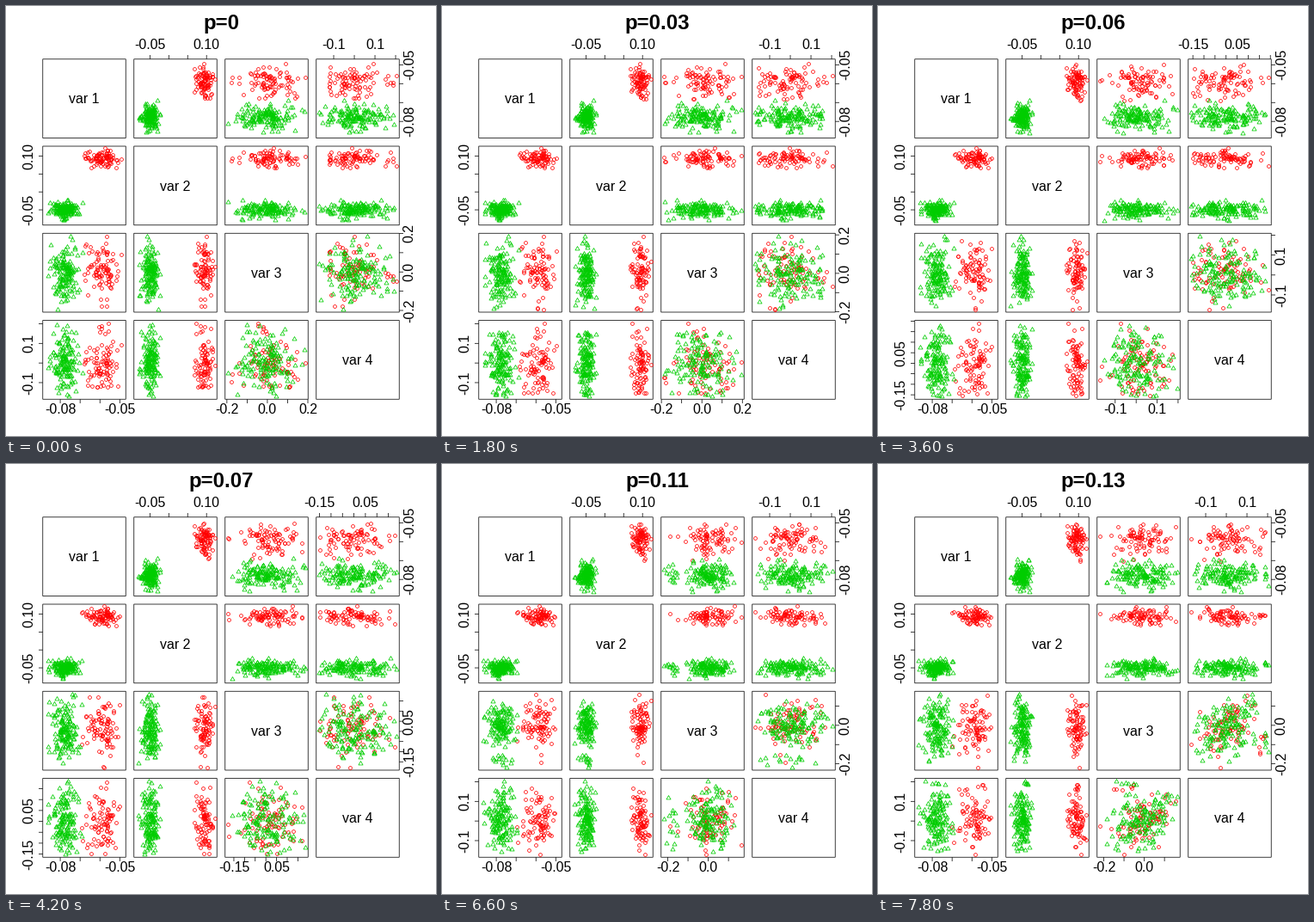
Write a matplotlib script that moves like this. It is 500x500 px and loops after 8 s.

```python
import numpy as np
import matplotlib.pyplot as plt
from matplotlib.animation import FuncAnimation
from matplotlib.path import Path

PX = 0.72                      # points per pixel at 100 dpi
SIZE = 500
LINE = 9.504                   # height of one margin line
LEFT, TOP = 4.5 * LINE, 6.5 * LINE
RIGHT = BOTTOM = SIZE - LEFT
W = (RIGHT - LEFT - 3 * LINE) / 4
H = (BOTTOM - TOP - 3 * LINE) / 4
TICK = LINE / 2
STROKE = 0.75
FONT, LABEL_GAP = 15.84, 11
RADIUS = 1.9
N_RED, N_GREEN = 90, 145
N = N_RED + N_GREEN

rng = np.random.default_rng(12)
A, B = np.clip(rng.normal(size=(2, 4, N)), -2.7, 2.7)
red = np.arange(N) < N_RED
green = ~red


def bump(step, centre, width):
    return np.exp(-((step - centre) / width) ** 2)


def ramp(step, start, end):
    u = np.clip((step - start) / (end - start), 0, 1)
    return u * u * (3 - 2 * u)


def limits(step):
    """Axis range of each variable; the last two breathe and slide."""
    squeeze = bump(step, 7, 1.6)
    shift = .02 * bump(step, 5, 2) - .024 * ramp(step, 7, 10) - .004
    half3, half4 = .205 - .0105 * squeeze, .201 - .02 * squeeze
    return [(-.0888, -.047), (-.0925, .1275),
            (shift - half3, shift + half3), (.0165 - half4, .0165 + half4)]


def fit(v, lim):
    """Scale v about zero so that it fills the axis inside a 4% margin."""
    pad = (lim[1] - lim[0]) * .04 / 1.08
    lo, hi = lim[0] + pad, lim[1] - pad
    return np.where(v < 0, v * lo / v.min(), v * hi / v.max())


def drift(k, angle):
    return np.cos(angle) * A[k] + np.sin(angle) * B[k]


def sample(step, lims):
    t = max(step - 1, 0)
    v1 = np.where(red, -.0592, -.0778)
    v1 = v1 + np.where(red, .0044, .0034) * drift(0, .03 * t)
    v2 = np.where(red, .0925, -.049) + .011 * drift(1, .03 * t)
    v3, v4 = drift(2, .13 * t), drift(3, .13 * t)

    # a green group splits off along variable 3
    w = bump(step, 10.5, 1.8)
    v3[green] *= 1 - .35 * w
    group = slice(N - 14, N)
    v3[group] += w * (-2.8 + .3 * B[0, group] - v3[group])

    # then the cloud tilts, leaving a few points aside
    c = ramp(step, 11, 13)
    v4 = v4 * (1 - .25 * c)
    v3 = v3 + .55 * c * v4
    aside = slice(N_RED - 7, N_RED + 10)
    v3[aside] += c * (-1.1 + .5 * A[0, aside] - v3[aside])
    v4[aside] += c * (1.9 + .45 * A[1, aside] - v4[aside])
    return [v1, v2, fit(v3, lims[2]), fit(v4, lims[3])]


def to_x(v, col, lim):
    return LEFT + col * (W + LINE) + W * (v - lim[0]) / (lim[1] - lim[0])


def to_y(v, row, lim):
    return TOP + row * (H + LINE) + H * (lim[1] - v) / (lim[1] - lim[0])


def ticks(lim):
    span = lim[1] - lim[0]
    unit = .01 if span < .1 else .05 if span < .392 else .1
    steps = np.arange(np.ceil(lim[0] / unit), np.floor(lim[1] / unit) + 1)
    return unit * steps, 1 if unit == .1 else 2


def text_width(s):
    return FONT * sum({'-': .333, '.': .278}.get(ch, .556) for ch in s)


def spaced_labels(values, places, digits):
    """Keep each label that clears the one before it."""
    end = -np.inf
    for v, p in zip(values, places):
        s = f'{v:.{digits}f}'
        half = text_width(s) / 2
        if p - half >= end + LABEL_GAP:
            end = p + half
            yield s, p


fig = plt.figure(figsize=(5, 5), dpi=100, facecolor='white')
ax = fig.add_axes([0, 0, 1, 1])
ax.set(xlim=(0, SIZE), ylim=(SIZE, 0))
ax.axis('off')


def put_text(x, y, s, size=FONT, **kw):
    return ax.text(x, y, s, fontsize=size * PX, family='Liberation Sans',
                   ha='center', va='baseline', rotation_mode='anchor', **kw)


def markers(shape, extent, color):
    return ax.plot([], [], ls='', marker=shape, ms=2 * extent * PX,
                   mfc='none', mec=color, mew=STROKE * PX)[0]


for row in range(4):
    for col in range(4):
        x, y = LEFT + col * (W + LINE), TOP + row * (H + LINE)
        ax.add_patch(plt.Rectangle((x, y), W, H, fill=False, ec='black',
                                   lw=STROKE * PX, snap=False))
        if row == col:
            put_text(x + W / 2, y + H / 2 + 5.7, f'var {row + 1}')

triangle = Path([(0, 1.555), (1.347, -.778), (-1.347, -.778), (0, 1.555)],
                closed=True)
reds = markers('o', RADIUS, '#ff0000')
greens = markers(triangle, 1.555 * RADIUS, '#00cd00')
tick_line, = ax.plot([], [], color='black', lw=STROKE * PX, snap=False,
                     solid_capstyle='butt')
title = put_text(SIZE / 2, 27.5, '', 24, weight='bold')
labels = []


def draw_axes(lims):
    while labels:
        labels.pop().remove()
    xs, ys = [], []
    for k, lim in enumerate(lims):
        values, digits = ticks(lim)
        px, py = to_x(values, k, lim), to_y(values, k, lim)
        if k % 2:
            edge_x, edge_y, out, base = LEFT, TOP, -TICK, -1.2 * LINE
        else:
            edge_x, edge_y, out, base = RIGHT, BOTTOM, TICK, 1.75 * LINE
        for p, q in zip(px, py):
            xs += [p, p, np.nan, edge_x, edge_x + out, np.nan]
            ys += [edge_y, edge_y + out, np.nan, q, q, np.nan]
        for s, p in spaced_labels(values, px, digits):
            labels.append(put_text(p, edge_y + base, s))
        for s, p in spaced_labels(values, -py, digits):
            labels.append(put_text(edge_x + base, -p, s, rotation=90))
    tick_line.set_data(xs, ys)


def update(frame):
    step = frame // 3
    lims = limits(step)
    data = sample(step, lims)
    cells = [(r, c) for r in range(4) for c in range(4) if r != c]
    xs = np.array([to_x(data[c], c, lims[c]) for r, c in cells])
    ys = np.array([to_y(data[r], r, lims[r]) for r, c in cells])
    reds.set_data(xs[:, red].ravel(), ys[:, red].ravel())
    greens.set_data(xs[:, green].ravel(), ys[:, green].ravel())
    draw_axes(lims)
    title.set_text(f'p={step / 100:g}')
    return []


anim = FuncAnimation(fig, update, frames=40, interval=200, repeat=True,
                     repeat_delay=0, blit=False)
plt.show()
```
